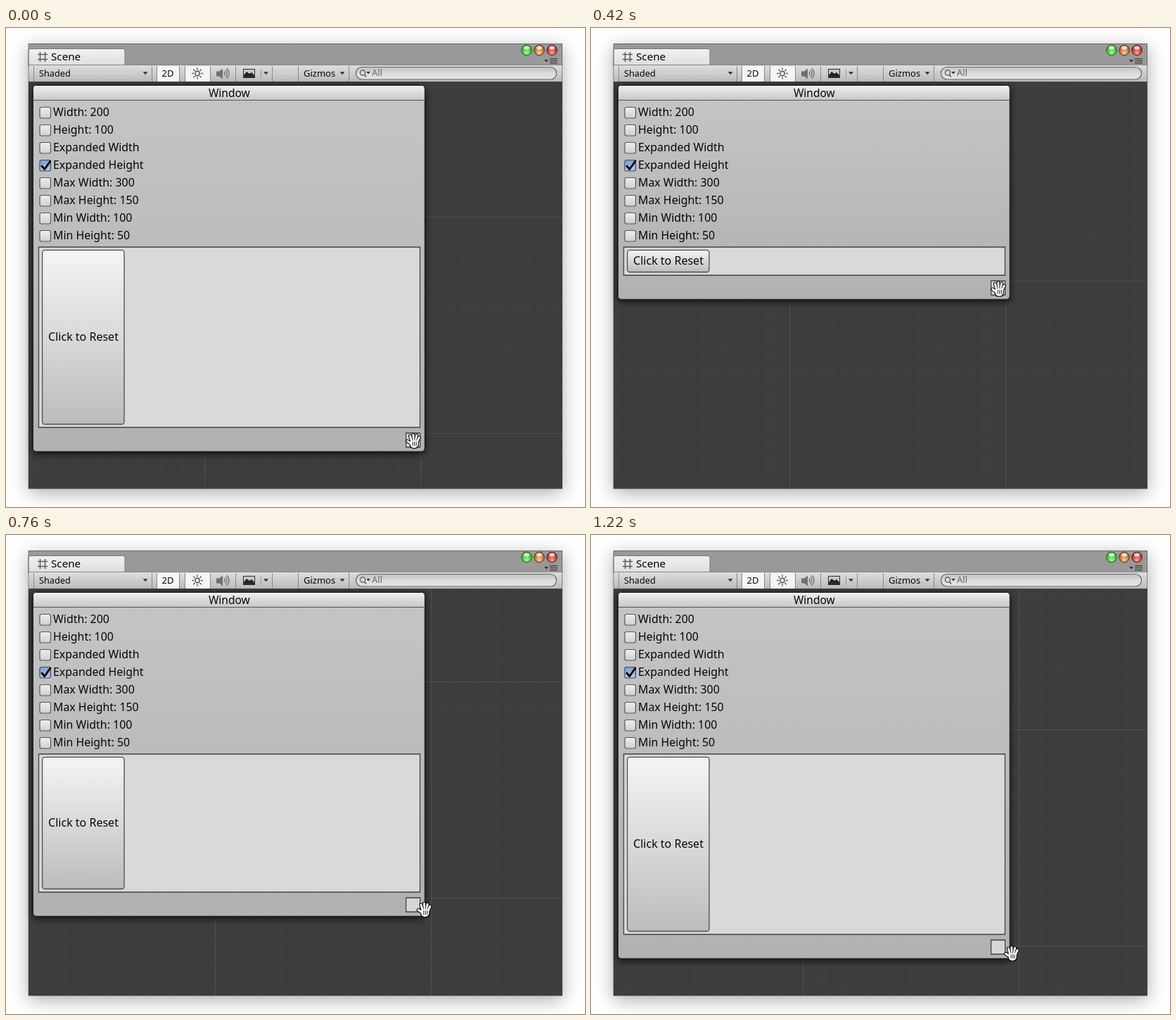
Write an HTML page with a canvas that moves like this. It is 823 px wide and 680 px high and loops after 1240 ms.

```html
<!DOCTYPE html>
<html lang="en">
<head>
<meta charset="utf-8">
<title>Resizable window layout</title>
<style>
  html, body { margin: 0; width: 100%; height: 100%; overflow: hidden; background: #fff; }
  canvas { display: block; }
</style>
</head>
<body>
<canvas id="stage" width="823" height="680"></canvas>
<script>
const ctx = document.getElementById('stage').getContext('2d');
const LOOP = 1240, STEP = 20;
const FONT = '"Noto Sans", "Open Sans", sans-serif';
const INK = '#060606';

const progress = (t, from, to) => Math.min(1, Math.max(0, (t - from) / (to - from)));
const easeInOut = (t, from, to) => { const u = progress(t, from, to); return u * u * (3 - 2 * u); };
const easeOut = (t, from, to) => 1 - (1 - progress(t, from, to)) ** 2;

// One drag: quick pull up, rest, quick pull down, slow settle.
const dragY = (t, pullTime) => 575.6 - 216 * easeInOut(t, 0, pullTime)
  + 133 * easeInOut(t, 547, 804) + 90.6 * easeOut(t, 640, 1220);
const dragX = t => 282.4 + 13.5 * easeInOut(t, 590, 750) + 5.4 * easeOut(t, 640, 1220);

function gradient(y0, y1, ...colors) {
  const g = ctx.createLinearGradient(0, y0, 0, y1);
  colors.forEach((c, i) => g.addColorStop(i / (colors.length - 1), c));
  return g;
}

function rect(x, y, w, h, fill) {
  ctx.fillStyle = fill;
  ctx.fillRect(x, y, w, h);
}

function box(x, y, w, h, radius, fill, stroke, width = 1) {
  ctx.beginPath();
  ctx.roundRect(x, y, w, h, radius);
  if (fill) { ctx.fillStyle = fill; ctx.fill(); }
  if (stroke) { ctx.strokeStyle = stroke; ctx.lineWidth = width; ctx.stroke(); }
}

const disc = (x, y, r, fill, stroke, width) => box(x - r, y - r, 2 * r, 2 * r, r, fill, stroke, width);

function line(x0, y0, x1, y1, color, width = 1) {
  ctx.beginPath();
  ctx.moveTo(x0, y0);
  ctx.lineTo(x1, y1);
  ctx.strokeStyle = color;
  ctx.lineWidth = width;
  ctx.stroke();
}

function poly(points, fill) {
  ctx.beginPath();
  points.forEach(([x, y]) => ctx.lineTo(x, y));
  ctx.fillStyle = fill;
  ctx.fill();
}

function text(str, x, y, size, align = 'left', color = INK) {
  ctx.font = `${size}px ${FONT}`;
  ctx.textAlign = align;
  ctx.fillStyle = color;
  ctx.fillText(str, x, y);
}

function withShadow(color, blur, dy, draw) {
  ctx.save();
  ctx.shadowColor = color;
  ctx.shadowBlur = blur;
  ctx.shadowOffsetY = dy;
  draw();
  ctx.restore();
}

const arrow = (x, y, s) => poly([[x - s, y - s / 2], [x + s, y - s / 2], [x, y + s / 2 + 0.5]], '#333');

function drawGrid(panX, panY) {
  ctx.save();
  ctx.beginPath();
  ctx.rect(32, 77, 759, 577);
  ctx.clip();
  rect(32, 77, 759, 577, '#3d3d3d');
  for (const major of [false, true]) {
    const color = major ? '#4f4f4f' : '#414141';
    for (let i = -20; i <= 20; i++) {
      if ((i % 10 === 0) !== major) continue;
      rect(Math.floor(panX + i * 30.7), 77, 1, 577, color);
      rect(32, Math.floor(panY + i * 30.7), 759, 1, color);
    }
  }
  ctx.restore();
}

function drawLight(x, hue) {
  const g = ctx.createRadialGradient(x, 36, 1, x, 32, 8);
  g.addColorStop(0, `hsl(${hue + 8} 95% 76%)`);
  g.addColorStop(1, `hsl(${hue} 75% 36%)`);
  disc(x, 31.5, 7.3, g, `hsl(${hue} 45% 24%)`);
  ctx.beginPath();
  ctx.ellipse(x, 28, 4, 2.6, 0, 0, 7);
  ctx.fillStyle = 'rgba(255,255,255,.75)';
  ctx.fill();
}

function drawSun(x, y) {
  disc(x, y, 3.2, '#eee', '#555', 1.4);
  for (let i = 0; i < 8; i++) {
    const c = Math.cos(i * Math.PI / 4), s = Math.sin(i * Math.PI / 4);
    line(x + c * 5, y + s * 5, x + c * 8, y + s * 8, '#555', 1.4);
  }
}

function drawSpeaker(x, y) {
  rect(x - 9, y - 3, 5, 7, '#707070');
  poly([[x - 6, y - 2], [x, y - 7], [x, y + 8], [x - 6, y + 3]], '#707070');
  for (let r = 3; r <= 9; r += 3) {
    ctx.beginPath();
    ctx.arc(x, y, r, -0.9, 0.9);
    ctx.strokeStyle = '#777';
    ctx.lineWidth = 1.5;
    ctx.stroke();
  }
}

function drawPicture(x, y) {
  rect(x, y, 17, 13, '#2a2a2a');
  rect(x + 1, y + 1, 15, 8, '#c9c9c9');
  poly([[x + 1, y + 9], [x + 5, y + 4], [x + 9, y + 7], [x + 12, y + 5], [x + 16, y + 9]], '#222');
}

function drawToolbar() {
  rect(32, 53, 759, 24, gradient(53, 77, '#dedede', '#bababa'));
  rect(32, 52, 759, 1, '#858585');
  rect(32, 76, 759, 1, '#484848');
  rect(215, 54, 31, 22, '#f6f6f6');
  rect(255, 54, 35, 22, '#f4f4f4');
  for (const x of [39, 207, 214, 246, 254, 290, 326, 378, 415, 487]) rect(x, 54, 1, 22, '#888');
  rect(362, 58, 1, 13, '#999');

  text('Shaded', 47, 69, 12.7);
  text('2D', 230, 69, 13, 'center');
  text('Gizmos', 423, 69, 13);
  for (const x of [198, 369.5, 478]) arrow(x, 64, 3.5);
  drawSun(272, 64.5);
  drawSpeaker(308, 64.5);
  drawPicture(337, 58);

  box(497.5, 55.5, 285, 17.5, 8.7, gradient(55, 73, '#bdbdbd', '#dcdcdc', '#e4e4e4'), '#686868', 1.2);
  disc(507, 63.5, 3.6, null, '#555', 1.3);
  line(509.5, 66.5, 512, 69.5, '#555', 1.5);
  arrow(515, 63.5, 2.8);
  text('All', 520, 68, 13, 'left', '#666');
}

function drawFrame() {
  withShadow('rgba(0,0,0,.32)', 24, 6, () => rect(32, 22, 759, 632, '#999'));
  rect(32, 22, 759, 1, '#8a8a8a');
  box(32, 29.5, 137, 26, [3, 3, 0, 0], gradient(30, 54, '#f0f0f0', '#dedede'), '#777');
  for (const d of [-3.5, 3.5]) {
    line(52 + d, 34, 52 + d, 48, '#555', 1.4);
    line(45, 41 + d, 59, 41 + d, '#555', 1.4);
  }
  text('Scene', 64, 46, 15.2);
  [110, 24, 0].forEach((hue, i) => drawLight(740 + 18 * i, hue));
  arrow(768, 46.5, 3);
  for (let y = 43; y < 50; y += 3) rect(773, y, 11, 1.4, '#444');
  drawToolbar();
}

function drawCheckbox(label, y, checked) {
  const colors = checked ? ['#7c9cce', '#b4ccec'] : ['#f0f0f0', '#cfcfcf'];
  box(48, y - 7.5, 15.5, 15.5, 2.5, gradient(y - 8, y + 8, ...colors), checked ? '#3c4a60' : '#585858', 1.2);
  if (checked) {
    ctx.lineCap = 'round';
    line(51, y + 1, 54.8, y + 5.5, INK, 2.8);
    line(54.8, y + 5.5, 63, y - 6, INK, 2.8);
    ctx.lineCap = 'butt';
  }
  text(label, 67, y + 5, 15.9);
}

const OPTIONS = ['Width: 200', 'Height: 100', 'Expanded Width', 'Expanded Height',
  'Max Width: 300', 'Max Height: 150', 'Min Width: 100', 'Min Height: 50'];

function drawWindow(bottom) {
  withShadow('rgba(0,0,0,.75)', 10, 3, () =>
    box(38.5, 81.5, 556.5, bottom - 81.5, 5, '#b4b4b4', '#1c1c1c'));
  box(39, 82, 555.5, bottom - 82.5, 4, gradient(103, bottom, '#c4c4c4', '#b1b1b1'));
  box(39, 82, 555.5, 20.5, [4, 4, 0, 0], gradient(82, 103, '#efefef', '#c6c6c6'));
  rect(39, 102, 555.5, 1, '#555');
  text('Window', 317.3, 98, 15.5, 'center');
  OPTIONS.forEach((label, i) => drawCheckbox(label, 120 + 25 * i, i === 3));

  const end = bottom - 38.5;
  box(46.5, 311, 542, bottom - 345, 0, '#d9d9d9', '#434343', 1.3);
  box(51.6, 315.4, 116.4, end - 315.4, 3.5,
    gradient(315, end, '#f5f5f5', '#d9d9d9', '#bcbcbc'), '#4c4c4c', 1.3);
  text('Click to Reset', 110, Math.round((315 + end) / 2) + 5, 16, 'center');
  box(568.6, bottom - 26, 20, 20, 0, '#d6d6d6', '#434343', 1.3);
}

function drawHand(x, y) {
  ctx.save();
  ctx.translate(x, y);
  ctx.lineCap = 'round';
  for (const [color, grow] of [['#000', 1], ['#fff', 0]]) {
    line(-3, 4, -9, 0.3, color, 3 + 2 * grow);
    for (let i = 0; i < 4; i++) {
      const angle = -2.2 + 0.54 * i;
      line(-2.5 + 2.2 * i, 2.5, 9 * Math.cos(angle), 8.8 * Math.sin(angle), color, 3 + 2 * grow);
    }
    box(-5 - grow, -grow, 11 + 2 * grow, 10 + 2 * grow, [2, 2, 5, 5], color);
  }
  for (let i = 0; i < 3; i++) {
    const px = -1.5 + 2.5 * i;
    line(px, 1.5, px, 6.5, '#222');
    line(px * 1.5, -5, px, -1, '#333', 0.8);
  }
  ctx.restore();
}

function render() {
  const t = Math.floor((performance.now() % LOOP) / STEP) * STEP;
  const panX = dragX(t), panY = dragY(t, 384);
  rect(0, 0, 823, 680, '#fff');
  drawFrame();
  drawGrid(panX, panY);
  drawWindow(Math.min(601, Math.round(panY + 25.4)));
  box(32, 22.5, 758.5, 631.5, 0, null, 'rgba(80,80,80,.6)');
  // The hand runs slightly ahead of what it drags.
  drawHand(panX + 297.3, dragY(t + 8, 334) + 11);
  requestAnimationFrame(render);
}
render();
</script>
</body>
</html>
```
